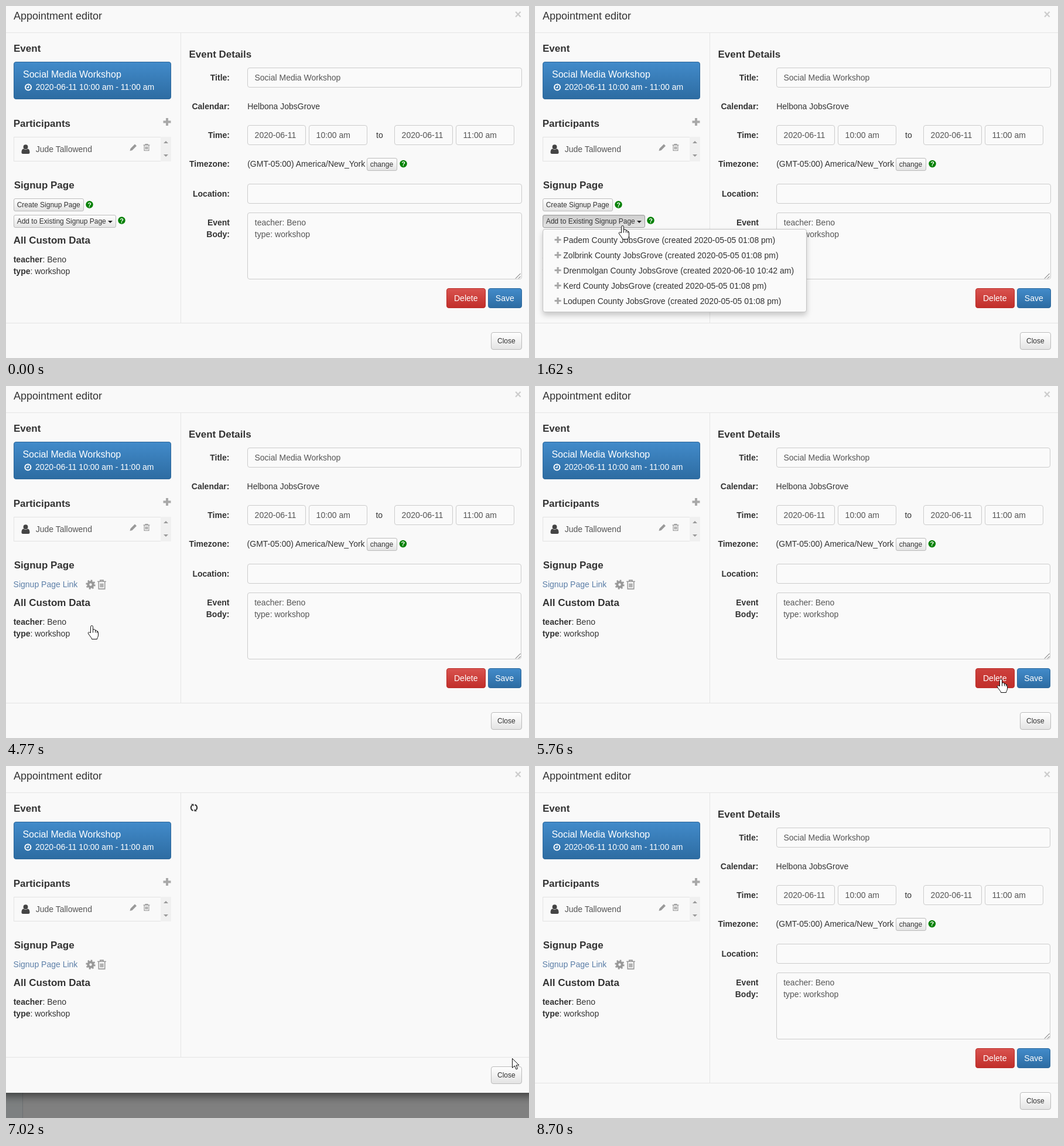
An HTML page for the animation above (9030 ms loop, 893 by 600 pixels).

```html
<!DOCTYPE html>
<html lang="en">
<head>
<meta charset="utf-8">
<title>Appointment editor</title>
<style>
  html, body { margin: 0; width: 100%; height: 100%; overflow: hidden; background: #f9f9f9; }
  svg { display: block; }
  text { font: 14px "Liberation Sans", Arial, sans-serif; fill: #333; }
  .h { font-size: 17px; font-weight: bold; }
  .b { font-weight: bold; }
  .end { text-anchor: end; }
  .small { font-size: 12px; }
  .muted { fill: #555; }
  .white { fill: #fff; }
  .line { fill: #e5e5e5; }
  .field { fill: #fafafa; stroke: #ccc; }
  .plain { fill: url(#plain); stroke: #bbb; }
  .plain.hover { fill: #e8e8e8; stroke: #adadad; }
  .plain.active { fill: url(#pressed); stroke: #999; }
  .blue { fill: url(#blue); stroke: #2b669a; }
  .blue.hover { fill: url(#blueHover); }
  .blue.active { fill: #2d6ca2; stroke: #1f4f7a; }
  .red { fill: url(#red); stroke: #b92c28; }
  .red.hover { fill: url(#redHover); }
  .stroke { fill: none; }
  #sheet { filter: drop-shadow(0 5px 8px rgba(0, 0, 0, .55)); }
  #menuBox { filter: drop-shadow(0 5px 5px rgba(0, 0, 0, .2)); }
</style>
</head>
<body>
<svg id="stage" width="893" height="600" viewBox="0 0 893 600"></svg>
<script>
const LOOP = 9030;
const OPEN = 1170, CHOSEN = 3060, LINKED = 3300, SAVED = 6510, RELOADED = 7320;
const COMPANY = 'JobsGrove';

// Markup helpers
const text = (x, y, content, cls = '') => `<text x="${x}" y="${y}" class="${cls}">${content}</text>`;
const rect = (x, y, w, h, attrs) => `<rect x="${x}" y="${y}" width="${w}" height="${h}" ${attrs}/>`;
const box = (x, y, w, h, cls, id = '', r = 3.5) =>
  rect(x + .5, y + .5, w - 1, h - 1, `rx="${r}" class="${cls}" id="${id}"`);
const path = (d, attrs) => `<path d="${d}" ${attrs}/>`;
const group = (content, id = '', attrs = '') => `<g id="${id}" ${attrs}>${content}</g>`;
const at = (x, y, content, scale = 1) => group(content, '', `transform="translate(${x} ${y}) scale(${scale})"`);
const gradient = (id, top, bottom) =>
  `<linearGradient id="${id}" x2="0" y2="1"><stop stop-color="${top}"/><stop offset="1" stop-color="${bottom}"/></linearGradient>`;
const smallButton = (x, y, w, label, id = '') =>
  box(x, y, w, 22, 'plain', id, 2.5) + text(x + 5.7, y + 15, label, 'small');

// Icons, drawn around their centre
const help = (x, y) => at(x, y, '<circle r="6.2" fill="#008000"/>'
  + '<text y="4" class="white b" style="font-size:11px;text-anchor:middle">?</text>');
const plus = (x, y, size, thick) =>
  at(x, y, path(`M${-size / 2} 0H${size / 2}M0 ${-size / 2}V${size / 2}`, `stroke="#a8a8a8" stroke-width="${thick}"`));
const trash = (x, y, scale) => at(x, y,
  path('M-7-5H7M-2.5-5V-7H2.5V-5M-5-5V7H5V-5M-2-2V4.5M0-2V4.5M2-2V4.5', 'class="stroke" stroke="#999" stroke-width="1.5"'), scale);
const gear = (x, y) => at(x, y, '<g class="stroke" stroke="#999"><circle r="4.2" stroke-width="4"/>'
  + '<circle r="6.8" stroke-width="2.8" stroke-dasharray="2.67"/></g>');
const refresh = (id, x, y, color) => at(x, y, group(
  path('M1.5-5A5.2 5.2 0 0 1 3 4.2M-1.5 5A5.2 5.2 0 0 1-3-4.2', `class="stroke" stroke="${color}" stroke-width="2"`)
  + path('M.5 2.2V6.2H5zM-.5-2.2V-6.2H-5z', `fill="${color}"`), id));
const caret = (x, y, half, height, color) => path(`M${x - half} ${y}h${2 * half}l${-half} ${height}z`, `fill="${color}"`);

const customData = group(
  text(12.7, 405, 'All Custom Data', 'h')
  + text(12.7, 437, '<tspan class="b">teacher</tspan>: Beno')
  + text(12.7, 457, '<tspan class="b">type</tspan>: workshop'), 'custom');

const eventPanel = text(13, 78, 'Event', 'h')
  + box(13, 95, 269, 64, 'blue')
  + group(text(29, 122, 'Social Media Workshop', 'white" style="font-size:16px')
    + at(38, 138.5, '<circle r="5" class="stroke" stroke="#fff" stroke-width="2"/>'
      + path('M.5-3V.7H-2.5', 'class="stroke" stroke="#fff" stroke-width="1.4"'))
    + text(50.5, 143, '2020-06-11 10:00 am - 11:00 am', 'white'), '', 'class="nudge"');

const participants = text(12.7, 206, 'Participants', 'h') + plus(275, 197.5, 13, 4)
  + box(13, 223, 252, 42, 'stroke" stroke="#e3e3e3', '', 0)
  + rect(264, 223, 18, 42, 'fill="#f0f0f0"')
  + caret(273, 234, 4, -4, '#999') + caret(273, 253, 4, 4, '#999')
  + at(33.5, 244, '<circle cy="-3.8" r="3.9" fill="#444"/>'
    + path('M-7 5.5C-7 1-5-.5-3.5-.5Q0 2 3.5-.5C5-.5 7 1 7 5.5Q7 8 4.5 8H-4.5Q-7 8-7 5.5z', 'fill="#444"'))
  + text(50.7, 249, 'Jude Tallowend', 'muted')
  + at(217.5, 241, path('M-6 6l1-4L2.5-5.5l3 3L-2 5z', 'fill="#999"')) + trash(240, 241, .78);

const signup = text(13.7, 311, 'Signup Page', 'h')
  + group(smallButton(13, 328, 120, 'Create Signup Page') + help(142.5, 338.5), 'create')
  + group(smallButton(13, 356, 175, 'Add to Existing Signup Page', 'add')
    + caret(178, 366, 4, 4, '#222') + help(197.5, 365.5), 'existing')
  + group(box(13, 356, 27, 22, 'plain" opacity=".6') + refresh('spinSmall', 26.5, 367, '#888') + help(49.5, 365.5), 'adding')
  + group(text(12.6, 343, 'Signup Page Link', '" style="fill:#5c7fa8')
    + gear(144.5, 338.5) + trash(163.5, 338.5, 1.05), 'linked');

const labels = [['Title:', 127], ['Calendar:', 176], ['Time:', 225], ['Timezone:', 274],
  ['Location:', 325], ['Event', 374], ['Body:', 394]]
  .map(([label, y]) => text(382, y, label, 'b end')).join('');
const timeFields = [[412, '2020-06-11'], [517, '10:00 am'], [663, '2020-06-11'], [768, '11:00 am']]
  .map(([x, value]) => box(x, 203, 100, 34, 'field') + text(x + 12.6, 225, value, 'muted')).join('');
const wideFields = [[105, 34], [303, 34], [352, 114]]
  .map(([y, h]) => box(412, y, 469, h, 'field wide')).join('');

const details = group(wideFields + timeFields
  + text(424.5, 127, 'Social Media Workshop', 'muted')
  + path('M870 464.5L878.5 456M875 464.5L878.5 461', 'stroke="#555"')
  + smallButton(616, 259, 52, 'change')
  + box(752, 481, 67, 34, 'red', 'delete') + text(765, 503, 'Delete', 'white')
  + box(823, 481, 58, 34, 'blue', 'save')
  + group(text(312.5, 88, 'Event Details', 'h') + labels
    + text(412.2, 176, 'Helbona ' + COMPANY) + text(632, 225, 'to')
    + text(412.2, 274, '(GMT-05:00) America/New_York') + help(678.5, 269)
    + text(424.8, 374, 'teacher: Beno', 'muted') + text(424.8, 394, 'type: workshop', 'muted')
    + text(835.8, 503, 'Save', 'white'), '', 'class="nudge"'), 'details');

const pages = [['Padem', '05-05 01:08 pm'], ['Zolbrink', '05-05 01:08 pm'], ['Drenmolgan', '06-10 10:42 am'],
  ['Kerd', '05-05 01:08 pm'], ['Lodupen', '05-05 01:08 pm']];
const menu = group(box(13, 380, 451, 142, '" fill="#fafafa" stroke="#c4c4c4', 'menuBox')
  + rect(14, 386, 449, 26, 'id="menuHover" fill="url(#rowHover)"')
  + pages.map(([name, date], i) => plus(39, 398.5 + 26 * i, 11, 3.2)
    + text(48.3, 404 + 26 * i, `${name} County ${COMPANY} (created 2020-${date})`)).join(''), 'menu');

const cursors = group(
  path('M0 0V16L4 12.5L6.5 18.5L9 17.5L6.5 11.5H11.5Z', 'id="arrow"')
  + path('M-2 12V2a2 2 0 0 1 4 0v6a2 2 0 0 1 4 .5a2 2 0 0 1 3 1a2 2 0 0 1 2 2v5c0 3-2 4-2 6.5h-9c0-2-2-3.5-4-6.5l-2-3c-1-2 1-3 2-2zM2 8v4M6 8.5v3.5M9 9.5v3', 'id="hand"')
  + path('M-3-6.5H-1L0-6L1-6.5H3M0-6V6M-3 6.5H-1L0 6L1 6.5H3', 'id="beam" fill="none"'),
  'cursor', 'fill="#fff" stroke="#111"');

document.getElementById('stage').innerHTML = '<defs>'
  + gradient('plain', '#fff', '#e3e3e3') + gradient('pressed', '#cfcfcf', '#e2e2e2')
  + gradient('blue', '#428bca', '#2d6ca2') + gradient('blueHover', '#3880bd', '#2d6ca2')
  + gradient('red', '#d9534f', '#c12e2a') + gradient('redHover', '#cd413d', '#c12e2a')
  + gradient('rowHover', '#f5f5f5', '#e8e8e8') + '</defs>'
  + rect(0, 0, 893, 600, 'fill="#808080"') + rect(0, 540, 28, 60, 'fill="#7d8081"') + rect(28, 540, 1, 60, 'fill="#6d7072"')
  + rect(-20, -20, 933, 700, 'id="sheet" fill="#f9f9f9"')
  + text(13, 23, 'Appointment editor', '" style="font-size:18px')
  + text(874.3, 20.6, '×', 'b" style="font-size:20px;fill:#ccc;text-anchor:middle')
  + rect(0, 45, 893, 1, 'class="line"') + rect(298, 45, 1, 495, 'class="line" id="divider"')
  + eventPanel + participants + signup + customData + details
  + group(refresh('spinLarge', 321, 71, '#333'), 'loading')
  + group(rect(0, 540, 893, 1, 'class="line"') + box(828, 556, 53, 30, 'plain') + text(839, 575, 'Close', 'small'), 'footer')
  + menu + cursors;

// Pointer: time, x, y and the shape used from that time on
const track = [
  [90, 874, 57, 'arrow'], [240, 718, 100, 'beam'], [300, 600, 142, 'arrow'], [360, 538, 167, 'arrow'],
  [390, 502, 185, 'beam'], [420, 450, 212, 'arrow'], [600, 190, 368, 'arrow'], [690, 160, 389, 'arrow'],
  [780, 150, 378, 'hand'], [930, 149, 374, 'hand'], [1620, 149, 374, 'hand'],
  [2010, 144, 401, 'hand'], [2670, 144, 402, 'hand'], [2760, 144, 406, 'hand'],
  [3090, 145, 406, 'beam'], [LINKED, 144, 405, 'hand'], [3690, 144, 405, 'hand'], [3720, 144, 406, 'hand'],
  [4740, 144, 406, 'hand'], [4770, 146, 408, 'hand'], [4830, 154, 410, 'arrow'], [4980, 225, 422, 'arrow'],
  [5250, 480, 456, 'arrow'], [5520, 690, 480, 'arrow'], [5670, 747, 486, 'arrow'], [5700, 763, 492, 'hand'],
  [5760, 795, 499, 'hand'], [5970, 850, 501, 'hand'], [6120, 864, 500, 'hand'],
  [SAVED, 864, 497, 'arrow'], [RELOADED, 864, 498, 'hand'], [8010, 864, 498, 'hand'],
  [8130, 875, 478, 'arrow'], [8250, 887, 400, 'arrow'], [8400, 886, 247, 'arrow'],
  [8520, 869, 140, 'arrow'], [8580, 870, 122, 'beam'], [8640, 875, 90, 'arrow'], [8700, 884, 56, 'arrow']];

const el = id => document.getElementById(id);
const show = (id, on) => { el(id).style.display = on ? '' : 'none'; };
const all = (selector, name, value) =>
  document.querySelectorAll(selector).forEach(node => node.setAttribute(name, value));
const setState = (id, hover, active) => {
  el(id).classList.toggle('hover', hover);
  el(id).classList.toggle('active', active);
};

function pointer(t) {
  if (t < 90 || t >= 8700) return null;
  const i = track.findIndex(key => key[0] > t) - 1;
  const [t0, x0, y0, shape] = track[i], [t1, x1, y1] = track[i + 1];
  const p = (t - t0) / (t1 - t0);
  return { x: x0 + (x1 - x0) * p, y: y0 + (y1 - y0) * p, shape };
}

function render(now) {
  const t = Math.floor(now % LOOP / 30) * 30;
  const busy = t >= SAVED && t < RELOADED;
  const linked = t >= LINKED;
  const cur = pointer(t);
  const over = (x0, y0, x1, y1) => !!cur && cur.x >= x0 && cur.x < x1 && cur.y >= y0 && cur.y < y1;

  show('create', !linked);
  show('existing', t < CHOSEN);
  show('adding', t >= CHOSEN && !linked);
  show('linked', linked);
  show('menu', t >= OPEN && t < CHOSEN);
  show('menuHover', over(14, 386, 463, 412));
  show('details', !busy);
  show('loading', busy);

  el('custom').setAttribute('transform', `translate(0 ${linked ? -30 : 0})`);
  el('footer').setAttribute('transform', `translate(0 ${busy ? -44 : 0})`);
  el('sheet').setAttribute('height', busy ? 577 : 700);
  el('divider').setAttribute('height', busy ? 451 : 495);
  all('.nudge', 'transform', `translate(${t < CHOSEN ? 0 : -.6} 0)`);
  all('.wide', 'width', t < CHOSEN ? 468 : 467);
  el('save').setAttribute('width', t < CHOSEN ? 57 : 56);
  el('spinSmall').setAttribute('transform', `rotate(${(t - 3180) * .18 + 90})`);
  el('spinLarge').setAttribute('transform', `rotate(${(t - 7020) * .18})`);

  setState('add', over(13, 356, 188, 379), t >= 1080 && t < CHOSEN);
  setState('delete', over(752, 481, 819, 515), false);
  setState('save', over(823, 481, 881, 515), t >= 6360 && t < SAVED);

  show('cursor', cur);
  if (cur) {
    el('cursor').setAttribute('transform', `translate(${Math.round(cur.x) + .5} ${Math.round(cur.y) + .5})`);
    for (const shape of ['arrow', 'hand', 'beam']) show(shape, shape === cur.shape);
  }
}

const start = performance.now();
(function tick() {
  render(performance.now() - start);
  requestAnimationFrame(tick);
})();
</script>
</body>
</html>
```
